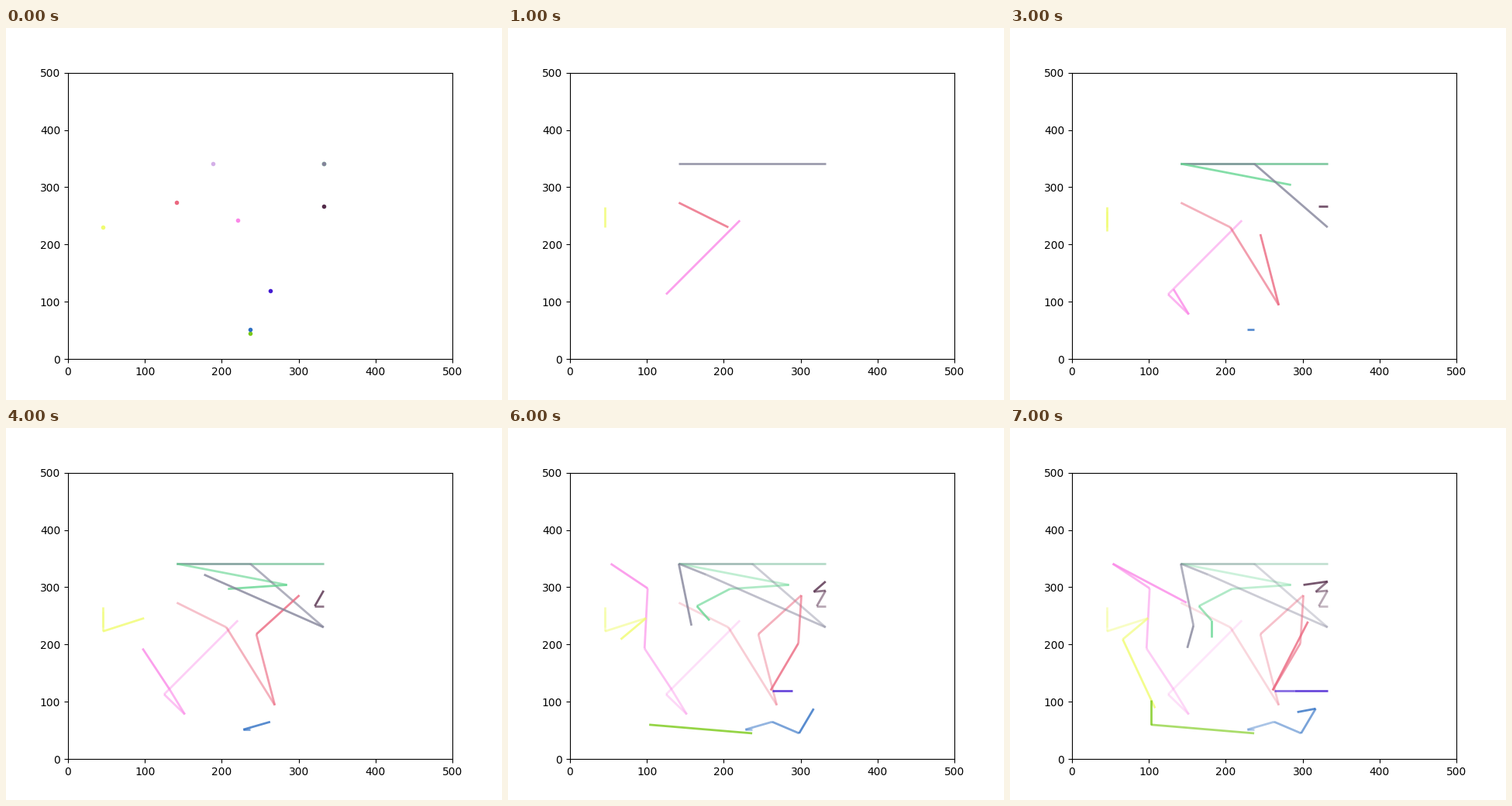
These frames come from a looping animation (640x480 px, 8000 ms). A matplotlib script:

```python
import matplotlib.pyplot as plt
from matplotlib.animation import FuncAnimation
from matplotlib.collections import LineCollection
from matplotlib.colors import to_rgba

STEPS = 8
FADE = 0.8

# Lines of the grid on which the walkers start and often turn
LEFT, MID, RIGHT = 141.5, 237, 332.5
TOP, HIGH, UPPER, MIDDLE = 341, 304, 267, 230

# colour: key points; a walker waits at its first point, then moves each step
WALKERS = {
    "#f0fc70": [(45.5, MIDDLE), (45.5, 265), (45.5, 258), (45.5, 223),
                (99, 246), (99, 246), (66, 209), (108, 89)],
    "#fb88e8": [(221, 242), (125, 113), (152, 78), (132, 122),
                (97, 193), (101, 298), (53, TOP), (149, 273)],
    "#eb6880": [(LEFT, 273), (206, MIDDLE), (269, 94), (245, 218),
                (301, 286), (297, 202), (261, 120), (307, 240)],
    "#66d692": [(RIGHT, TOP), (LEFT, TOP), (285, HIGH), (208, 297),
                (165, UPPER), (181.5, 242), (181.5, 212)],
    "#84849a": [(RIGHT, TOP), (LEFT, TOP), (MID, TOP), (RIGHT, MIDDLE),
                (177, 322), (LEFT, TOP), (158, 233), (150, 194)],
    "#542c4a": [(RIGHT, UPPER), (321, UPPER), (RIGHT, 294), (317, 292),
                (RIGHT, 310), (301, HIGH)],
    "#7bca18": [(MID, 45), (103, 60), (103, 103)],
    "#2f70c4": [(MID, 51.5), (228, 51.5), (263, 65), (298, 45),
                (317, 88), (293, 82)],
    "#451cd2": [(263, 119), (289.5, 119), (RIGHT, 119)],
    "#d4b0e8": [(189, TOP)],
}


def position(points, step):
    wait = STEPS - len(points)
    return points[max(step - wait, 0)]


def moves(step):
    """Colour and segment of every walker that moves in this step."""
    for color, points in WALKERS.items():
        start, end = position(points, step - 1), position(points, step)
        if start != end:
            yield color, (start, end)


fig, ax = plt.subplots(figsize=(6.4, 4.8), dpi=100)
ax.set(xlim=(0, 500), ylim=(0, 500))

dots = [ax.plot(*points[0], ".", color=color)[0]
        for color, points in WALKERS.items()]
trails = ax.add_collection(LineCollection([], linewidths=2))


def draw(now):
    for dot in dots:
        dot.set_visible(now == 0)
    segments, colors = [], []
    for step in range(1, now + 1):
        alpha = FADE ** (now - step + 1)
        for color, segment in moves(step):
            segments.append(segment)
            colors.append(to_rgba(color, alpha))
    trails.set_segments(segments)
    trails.set_color(colors)
    return [*dots, trails]


anim = FuncAnimation(fig, draw, frames=STEPS, interval=1000, repeat=True)
plt.show()
```
